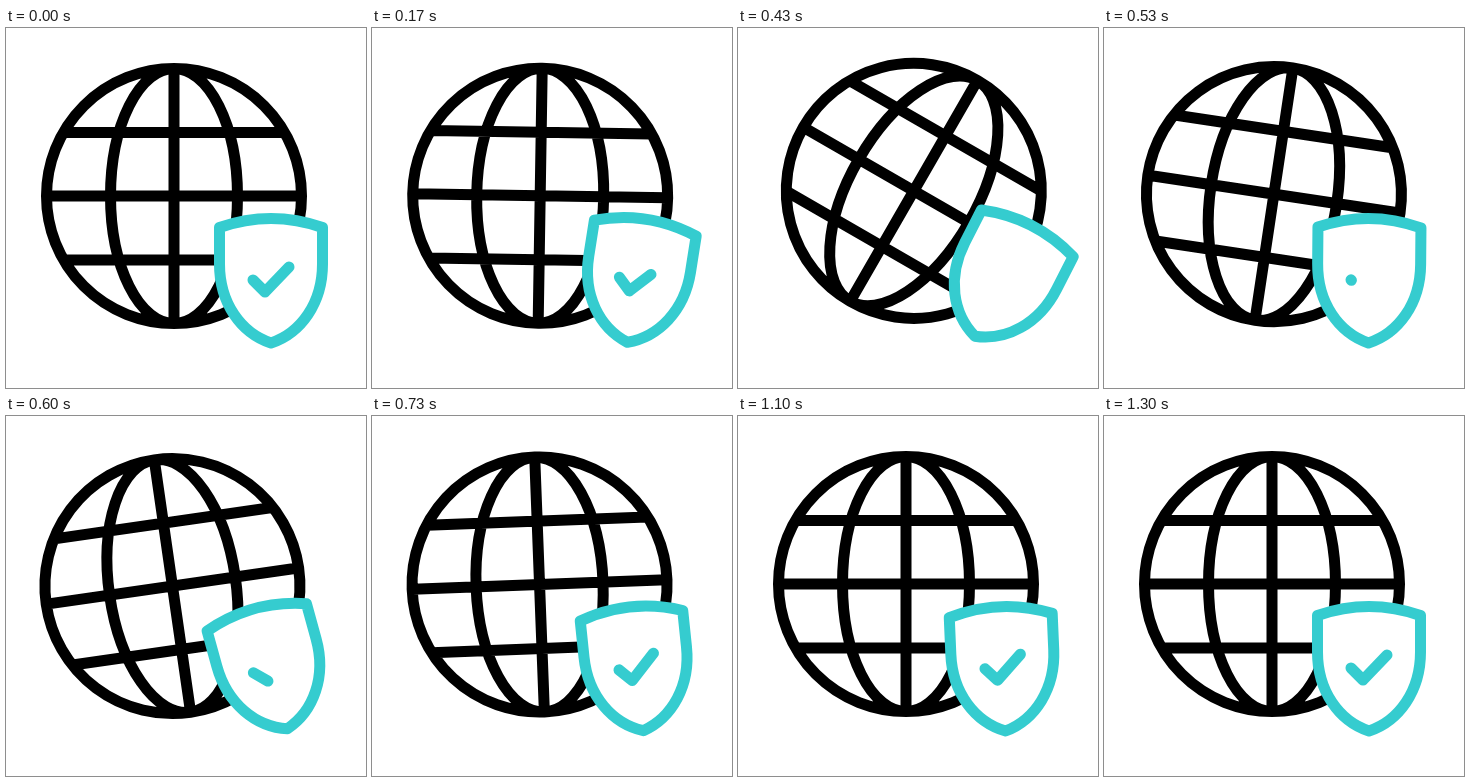
An HTML page that plays this animation: 360x360 px, repeating every 1.67 s.

```html
<!DOCTYPE html>
<html lang="en">
<head>
<meta charset="utf-8">
<title>Globe and shield</title>
<style>
  html, body { margin: 0; height: 100%; overflow: hidden; background: #fff; }
  svg { display: block; width: 100vw; height: 100vh; }
  path { fill: none; stroke-width: 11; stroke-linecap: round; stroke-linejoin: round; }
  #globe { stroke: #000; stroke-linecap: butt; }
  #shield path { stroke: #35cccf; }
  #shield .body { fill: #fff; }
</style>
</head>
<body>
<svg viewBox="0 0 360 360">
  <path id="globe" d="M40.5 168a127.5 127.5 0 0 1 255 0a127.5 127.5 0 0 1-255 0z
    M104.5 168a63.5 127.5 0 0 1 127 0a63.5 127.5 0 0 1-127 0z
    M168 41V295M41 168H295M58 104.5H278M58 232H278"/>
  <g id="shield">
    <path class="body" d="M213.5 199.5Q265 181.5 316.5 199.5V236C316.5 275 295 305 265 315C235 305 213.5 275 213.5 236Z"/>
    <path id="check" pathLength="1" d="M247 252L259 264L283 239"/>
  </g>
</svg>
<script>
  const LOOP = 1670, STEP = 100 / 3, LAST_STEP = 39;
  // Keys are [time in ms, value]
  const globeTurn = [[135, 0], [440, 30], [615, -9], [800, 0.7], [1100, 0]];
  const shieldTurn = [[0, 0], [433, 27], [605, -15.5], [900, 8.3], [1110, -2.5], [1300, 0]];
  const checkLength = [[90, 1], [410, 0], [520, 0], [730, 1]];

  const [globe, shield, check] = ['globe', 'shield', 'check'].map(id => document.getElementById(id));

  function valueAt(keys, t) {
    const next = keys.findIndex(key => key[0] > t);
    if (next < 0) return keys[keys.length - 1][1];
    if (next === 0) return keys[0][1];
    const [t0, a] = keys[next - 1], [t1, b] = keys[next];
    const p = (t - t0) / (t1 - t0);
    return a + (b - a) * p * p * (3 - 2 * p);
  }

  function draw(now) {
    const t = Math.min(LAST_STEP, Math.floor((now % LOOP + 4) / STEP)) * STEP;
    globe.setAttribute('transform', `rotate(${valueAt(globeTurn, t)} 181.5 180)`);
    shield.setAttribute('transform', `rotate(${valueAt(shieldTurn, t)} 265 253)`);
    const length = valueAt(checkLength, t);
    check.style.strokeDasharray = length < 1 ? `${length} 2` : 'none';
    check.style.visibility = length > 0 ? 'visible' : 'hidden';
  }

  const start = performance.now();
  function tick() {
    draw(performance.now() - start);
    requestAnimationFrame(tick);
  }
  tick();
</script>
</body>
</html>
```
